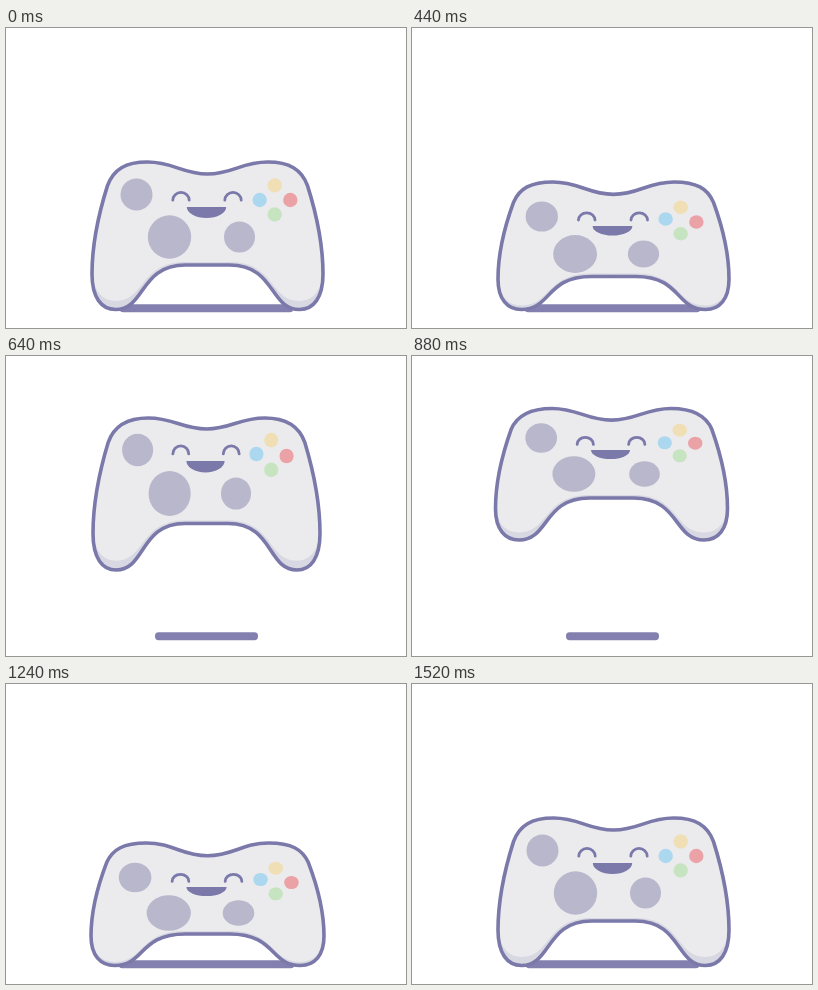
Write an HTML page with a canvas that moves like this. It is 400 px wide and 300 px high and loops after 1.76 s.

```html
<!DOCTYPE html>
<html lang="en">
<head>
<meta charset="utf-8">
<title>Jumping gamepad</title>
<style>
  html, body { margin: 0; width: 100%; height: 100%; overflow: hidden; background: #fff; }
  canvas { display: block; width: 400px; height: 300px; }
</style>
</head>
<body>
<canvas id="stage" width="400" height="300"></canvas>
<script>
const canvas = document.getElementById('stage');
const ctx = canvas.getContext('2d');
const LOOP = 1760, STEP = 40;

const INK = '#7b78aa', BAR = '#8380af', LIGHT = '#ebebee', SHADE = '#d7d8e1', KNOB = '#b9b7cb';
const YELLOW = '#f0dfb5', BLUE = '#acd8ef', RED = '#eba2a6', GREEN = '#c7e4c0';

const FIELDS = ['cx', 'half', 'top', 'arch', 'bottom', 'sx', 'sy', 'mouthY', 'stickY',
  'knobY', 'smallDx', 'padDx', 'padY', 'tilt', 'bar'];
const pose = (...values) => Object.fromEntries(FIELDS.map((name, i) => [name, values[i]]));

const rest = pose(201.5, 115.5, 134, 237, 281.5, 1, 1, 179, 166.5, 209, 32, 67.5, 172, 0, 87);
const crouch = pose(201.5, 115.5, 154, 248.5, 281.5, 1.01, .87, 198, 188.5, 226, 30, 67.5, 192.5, 1.5, 88);
const rise = pose(200.5, 113.5, 62, 167.5, 214, .97, 1.04, 105, 94, 137.5, 29.5, 65, 99, 1, 51.5);
const apex = pose(199.5, 116, 52.5, 142, 184, .99, .82, 94, 82, 118, 33, 68.5, 87, .2, 46.5);
const fall = pose(199.5, 111.5, 66, 180, 228.5, .91, 1.18, 111, 99.5, 147.5, 27.5, 60.5, 104, 1.3, 57.5);
const squash = pose(201.5, 116.5, 159, 250, 281.5, 1.02, .82, 203, 193.5, 229, 31, 68.5, 197, 1.5, 88);
const deep = pose(201.5, 117.5, 162, 251.5, 281.5, 1.03, .79, 206, 197, 231, 31.5, 69, 200, 1.5, 89);

function lowered(base, dy, bar) {
  const p = { ...base, bar };
  for (const name of ['top', 'arch', 'bottom', 'mouthY', 'stickY', 'knobY', 'padY']) p[name] += dy;
  return p;
}

const keys = [
  [80, rest], [360, deep], [440, crouch], [540, lowered(fall, 27, 66)], [640, rise],
  [880, apex], [1040, fall], [1120, lowered(fall, 45, 78)], [1240, squash], [1280, deep], [1520, rest]
];

const slope = (i, name) => (keys[i + 1][1][name] - keys[i][1][name]) / (keys[i + 1][0] - keys[i][0]);

// Monotone tangents: flat at turning points, harmonic mean elsewhere.
function tangent(i, name) {
  if (i === 0 || i === keys.length - 1) return 0;
  const a = slope(i - 1, name), b = slope(i, name);
  return a * b <= 0 ? 0 : 2 * a * b / (a + b);
}

function poseAt(time) {
  if (time <= keys[0][0] || time >= keys[keys.length - 1][0]) return rest;
  const i = keys.findIndex(([end]) => end > time) - 1;
  const [t0, from] = keys[i], [t1, to] = keys[i + 1];
  const d = t1 - t0, u = (time - t0) / d, v = 1 - u;
  const p = {};
  for (const name of FIELDS) {
    p[name] = from[name] * v * v * (1 + 2 * u) + to[name] * u * u * (3 - 2 * u)
      + d * u * v * (v * tangent(i, name) - u * tangent(i + 1, name));
  }
  return p;
}

function ellipse(x, y, rx, ry, color) {
  ctx.beginPath();
  ctx.ellipse(x, y, rx, ry, 0, 0, Math.PI * 2);
  ctx.fillStyle = color;
  ctx.fill();
}

function bodyPath(p, lift = 0, archLift = 0) {
  const { cx, half, top, sx } = p;
  const arch = p.arch - archLift, bottom = p.bottom - lift;
  const h = bottom - top, dip = top + 12 * sx ** 3, k = half / 115.5;
  // Each row is one cubic curve from the middle of the top edge to the arch.
  const curves = [
    [25 * sx, dip, 34 * sx, top, 60 * sx, top],
    [82 * sx, top, 94 * k, top + .05 * h, 100 * k, top + .16 * h],
    [107 * k, top + .31 * h, half, top + .55 * h, half, top + .76 * h],
    [half, top + .92 * h, 106 * k, bottom, 92 * k, bottom],
    [62 * k, bottom, 68 * k, arch, 22 * k, arch]
  ];
  const path = new Path2D();
  for (const side of [-1, 1]) {
    const x = dx => cx + side * dx;
    path.moveTo(cx, dip);
    for (const [a, b, c, d, e, f] of curves) path.bezierCurveTo(x(a), b, x(c), d, x(e), f);
    path.lineTo(cx, arch);
  }
  return path;
}

function outlinePath(p) {
  const path = bodyPath(p);
  return path;
}

function drawBody(p) {
  const outline = outlinePath(p);
  const lift = Math.max(3, (p.bottom - p.arch - 22) * .38);
  ctx.fillStyle = SHADE;
  ctx.fill(outline);
  // Hides the seam between the two mirrored halves.
  ctx.fillRect(p.cx - 1, p.top + 14, 2, p.arch - p.top - 14);
  ctx.save();
  ctx.clip(outline);
  ctx.fillStyle = LIGHT;
  ctx.fill(bodyPath(p, lift, 3));
  ctx.restore();
  ctx.fillStyle = LIGHT;
  ctx.fillRect(p.cx - 1, p.top + 14, 2, p.arch - p.top - 17);
  ctx.strokeStyle = INK;
  ctx.lineWidth = 3.6;
  ctx.stroke(outline);
}

function drawFace({ cx, sx, sy, mouthY }) {
  const eyeY = mouthY - 6.8 * sy;
  ctx.strokeStyle = INK;
  ctx.lineWidth = 2.8;
  ctx.lineCap = 'round';
  for (const dx of [-26.5, 25.5]) {
    ctx.beginPath();
    ctx.ellipse(cx + dx * sx, eyeY, 8.2 * sx, 7.8 * (.5 + .5 * sy), 0, Math.PI, Math.PI * 2);
    ctx.stroke();
  }
  ctx.beginPath();
  ctx.ellipse(cx - 1, mouthY, 19.7 * sx, 11 * sy, 0, 0, Math.PI);
  ctx.fillStyle = INK;
  ctx.fill();
}

function drawControls(p) {
  const { cx, sx, sy, tilt, padY } = p;
  ellipse(cx - 71 * sx, p.stickY, 16 * sx, 16 * (.55 + .45 * sy), KNOB);
  ellipse(cx - 38 * sx, p.knobY, 21.7 * sx, 21.7 * sy, KNOB);
  ellipse(cx + p.smallDx, p.knobY, 15.5 * sx, 15.5 * sy, KNOB);

  const x = cx + p.padDx;
  const dx = 15.3 * (.5 + .5 * sx), dy = 14.5 * (.35 + .65 * sy);
  const button = (bx, by, color) => ellipse(bx, by, 7.2 * (.5 + .5 * sx), 7.2 * (.5 + .5 * sy), color);
  button(x - .3, padY - dy, YELLOW);
  button(x - dx, padY - tilt, BLUE);
  button(x + dx, padY + tilt, RED);
  button(x - .3, padY + dy, GREEN);
}

function drawBar({ bar }) {
  ctx.beginPath();
  ctx.roundRect(200.5 - bar, 276.3, bar * 2, 7.9, 3.6);
  ctx.fillStyle = BAR;
  ctx.fill();
}

function render(now) {
  const time = Math.floor(now % LOOP / STEP) * STEP;
  const p = poseAt(time);
  ctx.fillStyle = '#fff';
  ctx.fillRect(0, 0, 400, 300);
  drawBar(p);
  drawBody(p);
  drawControls(p);
  drawFace(p);
}

const start = performance.now();
function tick() {
  render(performance.now() - start);
  requestAnimationFrame(tick);
}
tick();
</script>
</body>
</html>
```
